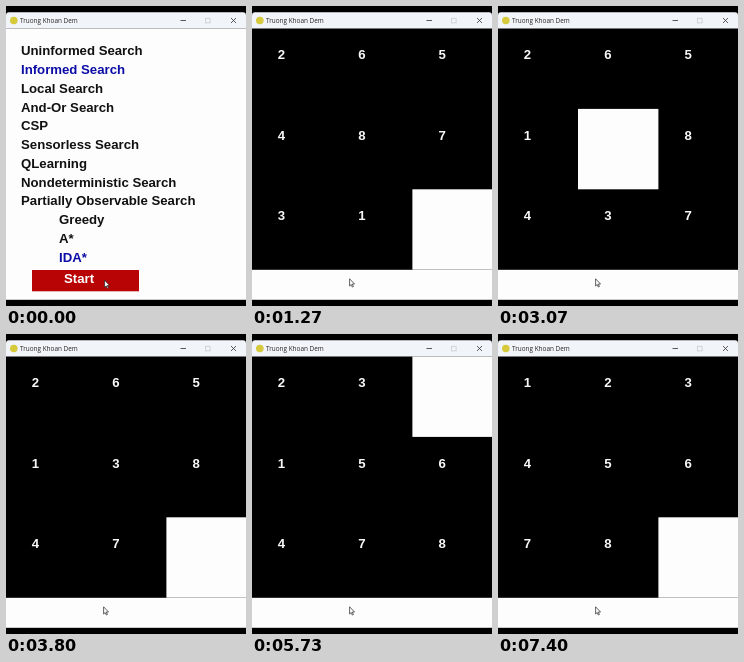
Recreate the animation shown at these times as an HTML page with a canvas. Size 240 px wide and 300 px high, loop 7470 ms.

```html
<!DOCTYPE html>
<html lang="en">
<head>
<meta charset="utf-8">
<title>Puzzle solver</title>
<style>
html, body { margin: 0; width: 100%; height: 100%; overflow: hidden; background: #000; }
canvas { display: block; width: 240px; height: 300px; }
</style>
</head>
<body>
<canvas id="stage" width="240" height="300"></canvas>
<script>
const ctx = document.getElementById('stage').getContext('2d');
const LOOP = 7470, BOARD_AT = 340, STEP = 301;
const CELL = 80.4, TOP = 22.5;
const WHITE = '#fdfdfd', BLUE = '#0c0ca6';
const BOLD = 'bold 13.2px "Liberation Sans", Arial, sans-serif';
const MENU = ['Uninformed Search', 'Informed Search', 'Local Search', 'And-Or Search', 'CSP',
  'Sensorless Search', 'QLearning', 'Nondeterministic Search', 'Partially Observable Search',
  'Greedy', 'A*', 'IDA*'];
const CHOSEN = ['Informed Search', 'IDA*'];

// Each letter is the direction in which the empty cell travels.
const MOVES = 'DRRULDLURDRUULDRULLDDRR';
const SHIFT = { U: -3, D: 3, L: -1, R: 1 };
const boards = ['265087431'];
for (const m of MOVES) {
  const b = [...boards[boards.length - 1]];
  const from = b.indexOf('0'), to = from + SHIFT[m];
  [b[from], b[to]] = [b[to], b[from]];
  boards.push(b.join(''));
}

function rect(x, y, w, h, color) {
  ctx.fillStyle = color;
  ctx.fillRect(x, y, w, h);
}

function text(s, x, y, color, font = BOLD) {
  ctx.font = font;
  ctx.fillStyle = color;
  ctx.fillText(s, x, y);
}

function line(color, ...pts) {
  ctx.strokeStyle = color;
  ctx.lineWidth = 0.8;
  ctx.beginPath();
  for (const [x1, y1, x2, y2] of pts) {
    ctx.moveTo(x1, y1);
    ctx.lineTo(x2, y2);
  }
  ctx.stroke();
}

function titleBar() {
  ctx.fillStyle = '#f1f4f9';
  ctx.beginPath();
  ctx.roundRect(0, 6.3, 240, 16.2, [3, 3, 0, 0]);
  ctx.fill();
  ctx.fillStyle = '#d6c93c';
  ctx.beginPath();
  ctx.arc(7.8, 14.5, 3.8, 0, Math.PI * 2);
  ctx.fill();
  text('Truong Khoan Dem', 14, 16.8, '#222', '6.4px "Open Sans", "Noto Sans", sans-serif');
  line('#333', [174.5, 14.5, 180, 14.5], [225, 12, 230, 17], [230, 12, 225, 17]);
  ctx.strokeStyle = '#c9ccd0';
  ctx.strokeRect(199.5, 12.3, 4.6, 4.6);
}

function menu() {
  rect(0, TOP, 240, 271.3, WHITE);
  MENU.forEach((s, i) =>
    text(s, i < 9 ? 15 : 53, 49.4 + i * 18.75, CHOSEN.includes(s) ? BLUE : '#111'));
  rect(26, 264, 107, 21.3, '#b80404');
  text('Start', 58, 277.3, '#fff');
}

function board(cells) {
  [...cells].forEach((n, i) => {
    const x = (i % 3) * CELL, y = Math.floor(i / 3) * CELL;
    if (n === '0') rect(x - 0.4, TOP + y, CELL, CELL, WHITE);
    else text(n, 25.8 + x, 53.4 + y, '#f8f8f8');
  });
  rect(0, 263.8, 240, 30, WHITE);
}

function cursor(x, y) {
  const shape = [[0, 0], [0, 7.2], [1.6, 5.7], [2.7, 8.2], [3.8, 7.7], [2.7, 5.3], [4.9, 5.2]];
  ctx.beginPath();
  shape.forEach(([dx, dy]) => ctx.lineTo(x + dx, y + dy));
  ctx.closePath();
  ctx.fillStyle = '#fff';
  ctx.fill();
  ctx.strokeStyle = '#222';
  ctx.lineWidth = 0.7;
  ctx.stroke();
}

function draw(t) {
  rect(0, 0, 240, 300, '#000');
  titleBar();
  if (t < BOARD_AT) menu();
  else board(boards[Math.min(MOVES.length, Math.floor((t - BOARD_AT) / STEP))]);
  if (t < 1000) cursor(98.6, 274.2);
  else cursor(97.6, 272.8);
}

const start = performance.now();
function tick() {
  draw((performance.now() - start) % LOOP);
  requestAnimationFrame(tick);
}
tick();
</script>
</body>
</html>
```
